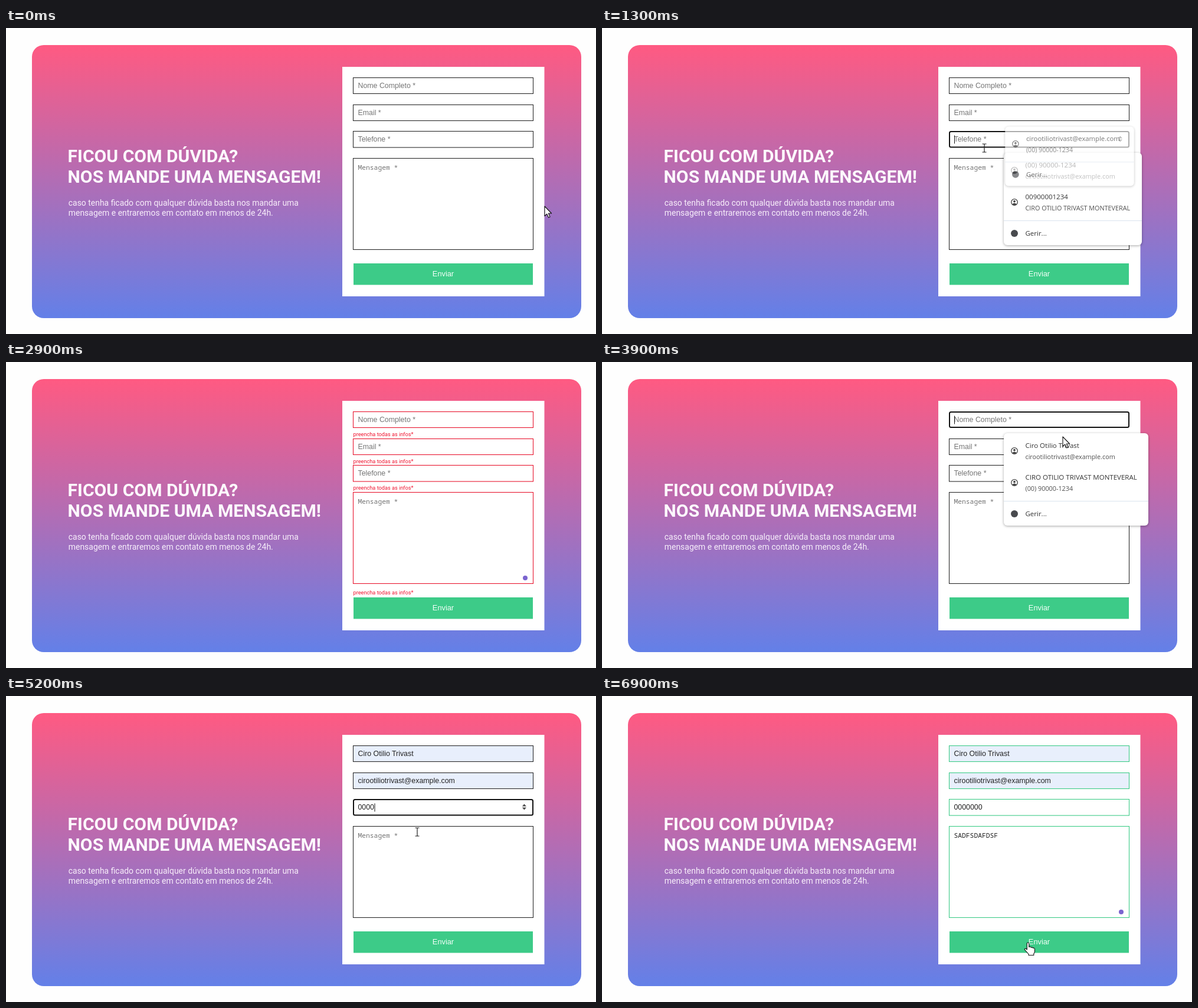
Animation, 1000 px wide and 520 px high, one loop 7.2 s. Source, as an HTML page:

```html
<!DOCTYPE html>
<html lang="pt-BR">
<head>
<meta charset="utf-8">
<title>Formulário de contato</title>
<style>
html, body { margin: 0; width: 100%; height: 100%; overflow: hidden; background: #fefefe; }
svg { display: block; width: 1000px; height: 520px; }
.head { font: 700 30.1px Roboto, sans-serif; fill: #fdf9fd; }
.sub { font: 400 13.95px Roboto, sans-serif; fill: #f8eefa; }
.field { font: 12.36px "Liberation Sans", Arial, sans-serif; fill: #222; }
.mono { font: 11.3px "Noto Sans Mono", monospace; fill: #222; }
.field.empty, .mono.empty { fill: #757575; }
.error { font: 9.2px Roboto, sans-serif; fill: #f0142f; }
.send { font: 12.8px "Liberation Sans", Arial, sans-serif; fill: #f4fff9; text-anchor: middle; }
.big { font: 11.5px "Open Sans", sans-serif; fill: #333; }
.small { font: 10.8px "Open Sans", sans-serif; fill: #505050; }
.menu > rect:first-child { filter: drop-shadow(0 1px 2px rgba(0, 0, 0, .35)); }
</style>
</head>
<body>
<svg viewBox="0 0 1000 520">
  <defs>
    <linearGradient id="sky" x2="0" y2="1">
      <stop stop-color="#ff5a82"/>
      <stop offset="1" stop-color="#6380e8"/>
    </linearGradient>
  </defs>
  <rect x="44" y="29" width="931" height="464" rx="20" fill="url(#sky)"/>
  <text class="head" x="104.6" y="228">FICOU COM DÚVIDA?</text>
  <text class="head" x="104.6" y="263">NOS MANDE UMA MENSAGEM!</text>
  <text class="sub" x="105.8" y="302">caso tenha ficado com qualquer dúvida basta nos mandar uma</text>
  <text class="sub" x="105.8" y="318.5">mensagem e entraremos em contato em menos de 24h.</text>
  <rect x="570" y="66" width="342.5" height="390" fill="#fff"/>
  <rect x="589" y="400" width="304" height="36.5" fill="#3dcb88"/>
  <text class="send" x="741" y="422">Enviar</text>
  <g id="form"></g>
  <circle id="dot" cx="880" cy="367" r="4" fill="#7b64cf"/>
  <path id="spin" d="M874.8 187.4l3.6-4 3.6 4zM874.8 189.6l3.6 4 3.6-4z" fill="#4a4a4a"/>
  <g id="menus"></g>
  <g id="pointer">
    <path id="arrow" d="M0 0V16.5L3.8 13L6.5 19L9 17.9L6.4 12H11.6Z" fill="#fff" stroke="#111" stroke-width="1.1" stroke-linejoin="round"/>
    <path id="beam" d="M-3.5-7H-1Q0-7 0-6Q0-7 1-7H3.5M0-6V6M-3.5 7H-1Q0 7 0 6Q0 7 1 7H3.5" fill="none" stroke="#222" stroke-width="1.2"/>
    <path id="hand" d="M1.2 0Q3-1.6 4.6 0V6.5Q6-.2 7.5 6.8Q9.3 5.6 10.2 7.5Q12.2 7 12.4 9V14Q12.3 17 10.5 18.5V20.5H1.5V18.5L-4-9.5Z" fill="#fff"/>
  </g>
</svg>
<script>
const LOOP = 7200, STEP = 100;
const $ = id => document.getElementById(id);

function add(parent, tag, attrs, text) {
  const node = document.createElementNS("http://www.w3.org/2000/svg", tag);
  set(node, attrs);
  if (text) node.textContent = text;
  parent.appendChild(node);
  return node;
}
function set(node, attrs) {
  for (const key in attrs) node.setAttribute(key, attrs[key]);
}
function show(node, on) {
  node.style.display = on ? "" : "none";
}

$("hand").setAttribute("d",
  "M1.3 12V1.8Q1.3 0 3 0T4.7 1.8V7.6Q7.8 6 8.3 8.5Q10.6 7.3 11.4 9.3" +
  "Q14.2 8.6 14.4 11V15Q14.3 17.5 12.8 19V21.5H4V19.5L-2.6 12.2Q-3.4 9.6-.5 10.4Z");
set($("hand"), { stroke: "#111", "stroke-width": 1.1, "stroke-linejoin": "round" });

const person = {
  name: "Ciro Otilio Trivast",
  full: "CIRO OTILIO TRIVAST MONTEVERAL",
  mail: "cirootiliotrivast@example.com",
  phone: "(00) 90000-1234",
  digits: "00900001234"
};

// Form fields
function makeField(y, h, hint, errorY, font) {
  const box = add($("form"), "rect", { x: 588.5, y, width: 305, height: h });
  const text = add($("form"), "text", { x: 596.5, y: y + (font === "mono" ? 19.5 : 17.8) });
  const caret = add($("form"), "rect", { y: y + 7, width: 1, height: 14, fill: "#111" });
  const error = add($("form"), "text", { class: "error", x: 588.5, y: errorY }, "preencha todas as infos*");
  return { box, text, caret, error, hint, font, x: 588.5, y, h };
}
const fields = {
  name: makeField(84.5, 27, "Nome Completo *", 126.3, "field"),
  mail: makeField(130.5, 27, "Email *", 172, "field"),
  phone: makeField(175.5, 27.5, "Telefone *", 217.3, "field"),
  note: makeField(221.5, 155, "Mensagem *", 395, "mono")
};

function drawField(f, value, focused, color, fill, failed) {
  const grow = focused ? 0.5 : 0;
  set(f.box, {
    x: f.x + grow, y: f.y + grow, width: 305 - 2 * grow, height: f.h - 2 * grow,
    rx: focused ? 2.5 : 0, fill, stroke: focused ? "#111" : color,
    "stroke-width": focused ? 2 : 1.1
  });
  f.text.textContent = value || f.hint;
  f.text.setAttribute("class", f.font + (value ? "" : " empty"));
  show(f.caret, focused);
  f.caret.setAttribute("x", 597 + (value ? f.text.getComputedTextLength() : 0));
  show(f.error, failed);
}

// Suggestion menus
function makeMenu(y, w, rows) {
  const x = 681, h = 49 + rows.length * 54;
  const g = add($("menus"), "g", { class: "menu" });
  add(g, "rect", { x, y, width: w, height: h, rx: 6, fill: "#fff" });
  const hover = add(g, "rect", { x, y: y + 4, width: w, height: 54, fill: "#eeeeef" });
  rows.forEach(([top, bottom], i) => {
    const ry = y + i * 54;
    add(g, "circle", { cx: 699, cy: ry + 30, r: 5.3, fill: "none", stroke: "#444", "stroke-width": 1.3 });
    add(g, "circle", { cx: 699, cy: ry + 28.6, r: 1.9, fill: "#444" });
    add(g, "path", { d: `M695.3 ${ry + 33.5}q3.7-4 7.4 0q-3.7 3-7.4 0z`, fill: "#444" });
    add(g, "text", { class: "big", x: 717.5, y: ry + 25 }, top);
    add(g, "text", { class: "small", x: 717.5, y: ry + 44 }, bottom);
  });
  add(g, "rect", { x, y: y + h - 42, width: w, height: 1, fill: "#d9e4ee" });
  add(g, "circle", { cx: 699, cy: y + h - 20, r: 6, fill: "#484a4e" });
  add(g, "text", { class: "big", x: 717.5, y: y + h - 16 }, "Gerir...");
  return { g, hover, cx: x + w / 2, cy: y + h / 2 };
}
const menus = {
  name: makeMenu(121, 245, [[person.name, person.mail], [person.full, person.phone]]),
  phone: makeMenu(212, 234, [[person.phone, person.mail], [person.digits, person.full]]),
  mail: makeMenu(166.5, 223, [[person.mail, person.phone]])
};
const menuTimes = [
  ["name", 400, 900], ["mail", 900, 1300], ["phone", 1300, 1700],
  ["name", 3700, 4200], ["phone", 4800, 5000]
];

function drawMenus(t) {
  for (const key in menus) {
    const m = menus[key];
    const span = menuTimes.find(([k, a, b]) => k === key && t >= a && t <= b);
    show(m.g, span);
    if (!span) continue;
    const leaving = t === span[2];
    m.g.setAttribute("opacity", leaving ? 0.65 : 1);
    m.g.setAttribute("transform", leaving
      ? `translate(${m.cx} ${m.cy}) scale(.98) translate(${-m.cx} ${-m.cy})` : "");
    show(m.hover, key === "name" && t >= 4000);
  }
}

// Pointer: time, shape, x, y
const track = [
  [0, "arrow", 913, 303], [300, "arrow", 860, 140], [400, "beam", 790, 100],
  [600, "beam", 760, 100], [800, "beam", 720, 146], [1000, "beam", 700, 146],
  [1200, "beam", 660, 192], [1300, "beam", 648, 204], [1500, "beam", 645, 290],
  [1700, "beam", 645, 300], [1900, "hand", 648, 415], [2200, "hand", 650, 418],
  [2300, "beam", 651, 383], [2500, "arrow", 560, 180], [2700, "arrow", 500, 40],
  [2800, "", 500, 40], [3500, "arrow", 760, 70], [3600, "beam", 775, 100],
  [3800, "beam", 780, 100], [3900, "arrow", 781, 127], [4000, "arrow", 781, 146],
  [4200, "arrow", 781, 148], [4300, "beam", 745, 178], [4600, "beam", 696, 201],
  [5000, "beam", 695, 195], [5500, "beam", 700, 285], [5800, "beam", 702, 297],
  [6200, "beam", 702, 297], [6500, "hand", 719, 416], [6600, "hand", 719, 418],
  [6800, "hand", 719, 418], [6900, "hand", 719, 419], [7200, "hand", 719, 419]
];

function drawPointer(t) {
  let i = track.length - 1;
  while (track[i][0] > t) i--;
  const [t0, shape, x0, y0] = track[i];
  const [t1, , x1, y1] = track[i + 1];
  const k = shape ? (t - t0) / (t1 - t0) : 0;
  const x = x0 + (x1 - x0) * k, y = y0 + (y1 - y0) * k;
  for (const id of ["arrow", "beam", "hand"]) show($(id), id === shape);
  $("pointer").setAttribute("transform", `translate(${x} ${y})`);
  return { shape, x, y };
}

const focusTimes = [
  [0, ""], [400, "name"], [800, "mail"], [1200, "phone"], [1600, "note"], [2000, ""],
  [3600, "name"], [4800, "phone"], [5500, "note"], [6900, ""]
];
const typed = (text, n) => text.slice(0, Math.max(0, Math.floor(n)));

function render(t) {
  const focus = focusTimes.filter(e => e[0] <= t).pop()[1];
  const failed = t >= 2000 && t < 3000;
  const sent = t >= 6900;
  const filled = t >= 4000;
  const color = failed ? "#e8162f" : sent ? "#3dcb88" : "#2a2a2a";
  const values = {
    name: filled ? person.name : "",
    mail: filled ? person.mail : "",
    phone: typed("0000000", (t - 4900) / 70),
    note: typed("SADFSDAFDSF", t <= 5800 ? (t - 5500) / 100 : 3 + (t - 5800) / 50)
  };
  for (const key in fields) {
    const tinted = filled && key !== "note" && !(key === "phone" && values.phone);
    drawField(fields[key], values[key], focus === key, color, tinted ? "#e8effc" : "#fff", failed);
  }
  drawMenus(t);
  const p = drawPointer(t);
  show($("spin"), focus === "phone" || (p.shape === "beam" && p.y > 175 && p.y < 204));
  show($("dot"), failed || sent);
}

let last = -1;
function tick() {
  const t = Math.floor(performance.now() % LOOP / STEP) * STEP;
  if (t !== last) render(last = t);
  requestAnimationFrame(tick);
}
tick();
</script>
</body>
</html>
```
